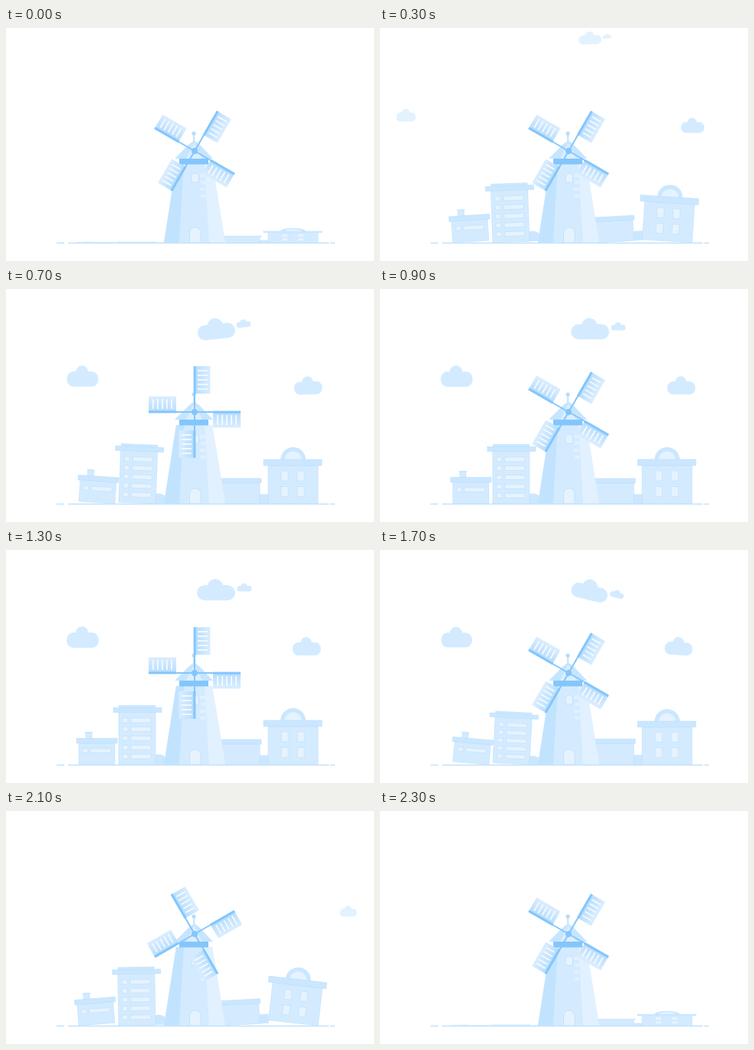
Write an HTML page with a canvas that moves like this. It is 480 by 305 pixels and loops after 2.4 s.

```html
<!DOCTYPE html>
<html lang="en">
<head>
<meta charset="utf-8">
<title>Windmill town</title>
<style>
html, body { margin: 0; width: 100%; height: 100%; overflow: hidden; background: #fff; }
canvas { display: block; }
</style>
</head>
<body>
<canvas id="stage" width="480" height="305"></canvas>
<script>
const g = document.getElementById('stage').getContext('2d');
const { exp, cos, PI } = Math;
const RAD = PI / 180, GROUND = 281;
const WALL = '#d4ebff', ROOF = '#cbe7ff', EDGE = '#bcdefb', PANE = '#e6f3ff', BLUE = '#84c6fc';

// Each building grows from a start height, dips at step 5 and tips at three key steps.
const BEATS = [0, 2, 5, 6, 9];
const buildings = [
  { draw: shop,  left: 95,  right: 142, start: .03, dip: .15,  tips: [-4.5, -1, 5] },
  { draw: tower, left: 147, right: 195, start: .02, dip: .28,  tips: [-1, -5, 3] },
  { draw: shed,  left: 281, right: 331, start: .27, dip: -.04, tips: [-3, -3, 0] },
  { draw: hall,  left: 342, right: 407, start: .26, dip: .04,  tips: [6.5, -4.7, 0] }
];

// Each cloud springs in from an offset (dx, dy) to its resting place.
const clouds = [
  { x: 100,   y: 114, dx: -66, dy: 0,   from: 3, damp: 3.2, wide: .84, high: 1,   tilt: 0 },
  { x: 274,   y: 52,  dx: 0,   dy: -39, from: 3, damp: 2.6, wide: 1,   high: 1,   tilt: 15, twin: true },
  { x: 392.5, y: 126, dx: 54,  dy: 5,   from: 2, damp: 1.7, wide: .74, high: .86, tilt: 4.5 }
];

function leanAt(tips, step) {
  const v = [0, ...tips, 0];
  const i = BEATS.findIndex(b => b > step);
  if (i < 0) return 0;
  const u = (step - BEATS[i - 1]) / (BEATS[i] - BEATS[i - 1]);
  return v[i - 1] + (v[i] - v[i - 1]) * (1 - cos(PI * u)) / 2;
}

function box(x1, y1, x2, y2, fill, edge) {
  g.fillStyle = fill;
  g.fillRect(x1, y1, x2 - x1, y2 - y1);
  if (edge) {
    g.strokeStyle = edge;
    g.lineWidth = .6;
    g.strokeRect(x1, y1, x2 - x1, y2 - y1);
  }
}

function poly(fill, ...p) {
  g.fillStyle = fill;
  g.beginPath();
  for (let i = 0; i < p.length; i += 2) g.lineTo(p[i], p[i + 1]);
  g.fill();
}

function disc(x, y, r, fill, start = 0) {
  g.fillStyle = fill;
  g.beginPath();
  g.arc(x, y, r, start, 2 * PI);
  g.fill();
}

const dome = (x, y, r, fill) => disc(x, y, r, fill, PI);

function arch(x1, y1, x2, y2) {
  const r = (x2 - x1) / 2;
  g.beginPath();
  g.moveTo(x1, y2);
  g.arc(x1 + r, y1 + r, r, PI, 0);
  g.lineTo(x2, y2);
  g.closePath();
  g.fillStyle = PANE;
  g.fill();
  g.strokeStyle = EDGE;
  g.lineWidth = .8;
  g.stroke();
}

function building({ draw, left, right, start, dip, tips }, step) {
  const lean = leanAt(tips, step);
  const corner = lean > 0 ? right : left; // tips over its lower corner
  g.save();
  g.translate(corner, GROUND);
  g.rotate(lean * RAD);
  g.scale(1, 1 - (1 - start) * exp(-step * step) - dip * exp(-.8 * (step - 5) ** 2));
  g.translate(-corner, -GROUND);
  draw();
  g.restore();
}

function shop() {
  box(104, 239, 112, 248, WALL, EDGE);
  box(103, 238, 113, 240, ROOF);
  box(95, 253, 142, GROUND, WALL, EDGE);
  box(92, 246.5, 145, 253, ROOF, EDGE);
  box(100, 260, 107, 265.5, PANE, EDGE);
  box(110, 260, 137, 265.5, PANE, EDGE);
}

function tower() {
  dome(199, GROUND, 13.5, ROOF);
  box(147, 203, 195, 207, ROOF);
  box(147, 212, 195, GROUND, WALL, EDGE);
  box(140, 206.5, 203, 212.5, ROOF, EDGE);
  for (let y = 220; y < 270; y += 11.8) {
    box(152, y, 159, y + 6, PANE, EDGE);
    box(163, y, 189, y + 6, PANE, EDGE);
  }
}

function shed() {
  box(331, 268.5, 343, GROUND, ROOF);
  box(278, 254, 331, GROUND, WALL, EDGE);
  box(278, 248, 333, 254, ROOF, EDGE);
}

function hall() {
  dome(374.5, 223.5, 16.5, ROOF);
  dome(374.5, 223.5, 11, PANE);
  box(342, 231, 407, GROUND, WALL, EDGE);
  box(336, 223, 412, 231, ROOF, EDGE);
  for (const x of [359, 380])
    for (const y of [238, 258.5]) box(x, y, x + 9, y + 13, PANE, EDGE);
}

function puff(x, y, k) {
  g.beginPath();
  g.roundRect(x - 25 * k, y - 6 * k, 50 * k, 20 * k, 10 * k);
  g.arc(x - k, y - 3.5 * k, 10.5 * k, 0, 2 * PI);
  g.fill();
}

function cloud({ x, y, dx, dy, from, damp, wide, high, tilt, twin }, step) {
  const age = step - from;
  if (age < 0) return;
  const u = age / (5 - from), away = exp(-damp * u) * cos(PI * u);
  const size = 1 - .4 * exp(-.8 * age);
  g.save();
  g.translate(x + dx * away, y + dy * away);
  g.rotate(tilt * RAD * cos(PI * step) * exp(-.4 * (step - 5.5) ** 2));
  g.scale(wide * size, high * size);
  g.globalAlpha = Math.min(1, .65 + .35 * age);
  g.fillStyle = WALL;
  puff(0, 0, 1);
  if (twin) puff(37, -3, .38);
  g.restore();
}

function mill() {
  poly(WALL, 222, 178, 269, 178, 286, GROUND, 206, GROUND);
  poly('#c2e3fe', 222, 178, 232, 178, 226, GROUND, 206, GROUND);
  poly('#e2f1ff', 259, 178, 269, 178, 286, GROUND, 265, GROUND);
  for (let i = 0; i < 4; i++) box(253 + i % 2, 191 + i * 9, 260, 195 + i * 9, '#e2f1ff');
  arch(242, 190, 251.5, 202);
  arch(239.5, 261, 254, GROUND);
  box(244.3, 139, 245.9, 149, '#b5dcfd');
  disc(245, 138, 2.6, '#b5dcfd');
  poly('#c6e5ff', 245.5, 147, 253, 153, 270, 171, 220, 171, 238, 153);
  poly('#dceeff', 245.5, 150, 256, 171, 235, 171);
  box(226, 171, 264, 178.5, BLUE);
}

function sails(step) {
  g.save();
  g.translate(246, 161);
  g.rotate((30 - 30 * step) * RAD);
  const shade = g.createLinearGradient(0, 0, 20, 0);
  shade.addColorStop(0, '#b6ddfd');
  shade.addColorStop(1, '#daedff');
  for (let i = 0; i < 4; i++) {
    box(0, -60, 20.5, -24, shade);
    for (let y = -55; y < -26; y += 6) box(4, y, 17, y + 1.8, '#f5faff');
    box(-1, -60, 1, 0, BLUE);
    box(-1.4, -60, 1.6, -24, BLUE);
    g.rotate(PI / 2);
  }
  disc(0, 0, 4.2, BLUE);
  g.restore();
}

function draw(now) {
  // The motion runs forwards, then backwards, in steps of 100 ms.
  const tick = Math.floor(now % 2400 / 100), step = Math.min(tick, 23 - tick);
  g.fillStyle = '#fff';
  g.fillRect(0, 0, 480, 305);
  for (const c of clouds) cloud(c, step);
  for (const b of buildings) building(b, step);
  mill();
  for (const [a, b] of [[66, 76], [81, 421], [423, 429]]) box(a, 280.7, b, 282.3, '#c3e3fe');
  sails(step);
}

const start = performance.now();
function loop() {
  draw(performance.now() - start);
  requestAnimationFrame(loop);
}
loop();
</script>
</body>
</html>
```
